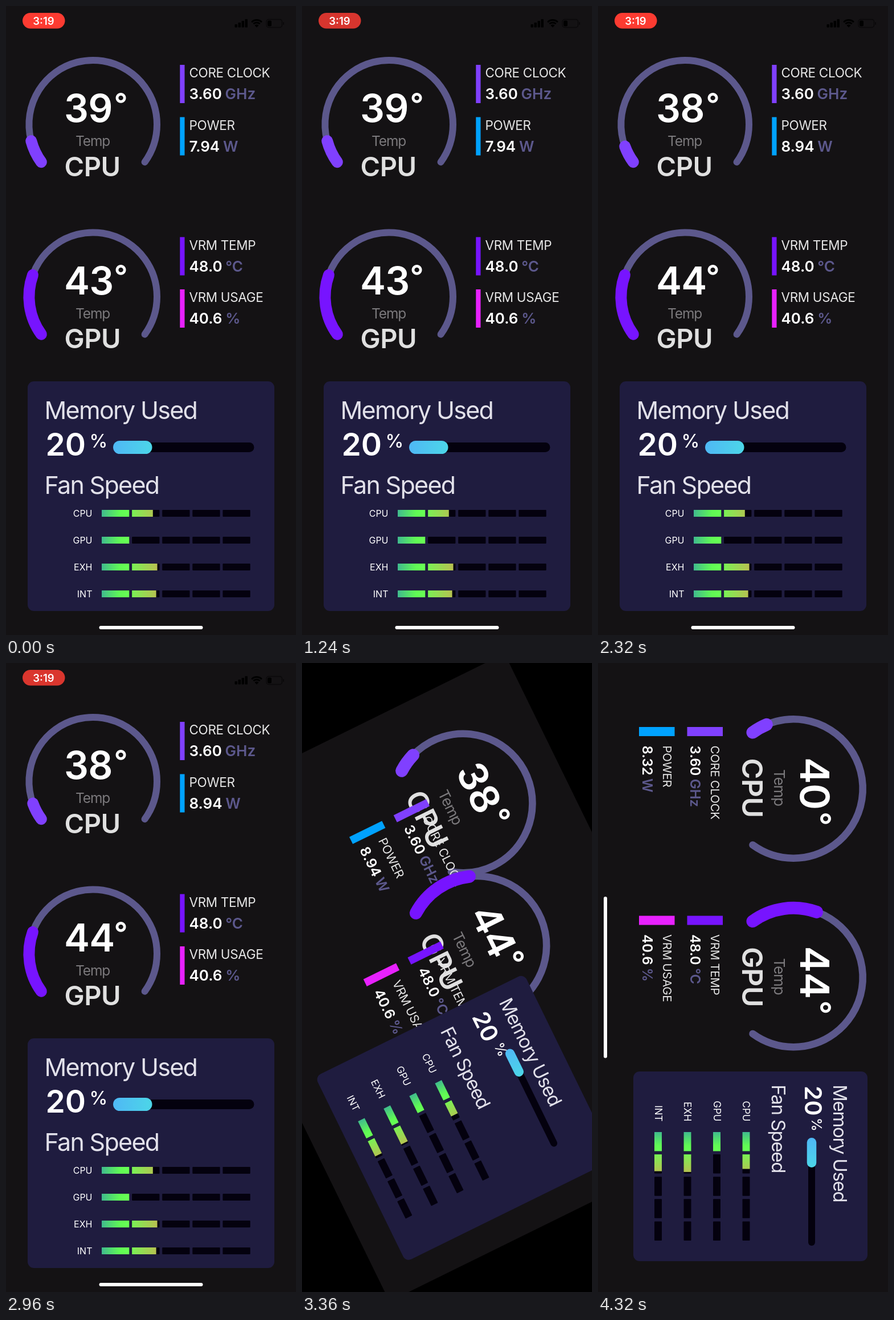
Write an HTML page with a canvas that moves like this. It is 509x1101 px and loops after 5400 ms.

```html
<!DOCTYPE html>
<html lang="en">
<head>
<meta charset="utf-8">
<title>System monitor</title>
<style>
html, body { margin: 0; width: 509px; height: 1101px; overflow: hidden; background: #000; }
canvas { display: block; }
</style>
</head>
<body>
<canvas id="stage" width="509" height="1101"></canvas>
<script>
const ctx = document.getElementById('stage').getContext('2d');
const LOOP = 5400, TURN = 3184, TURN_TIME = 275, UPDATES = [1560, 3400];
const BG = '#141214', RING = '#5c588c', TRACK = '#04010e';
const FANS = [['CPU', 1.76], ['GPU', 1], ['EXH', 1.92], ['INT', 1.88]];

const clamp = x => Math.min(1, Math.max(0, x));
const smooth = x => (x = clamp(x), x * x * (3 - 2 * x));
const rad = deg => deg * Math.PI / 180;

// p: turn progress. Positions glide from portrait to landscape, most sizes jump.
let p = 0;
const mix = (a, b) => a + (b - a) * p;
const jump = (a, b) => p > 0 ? b : a;
// How far the meters lag behind the card while it turns.
const lag = () => 95 * p * (1 - p);

function text(str, x, y, size, weight, color, spacing = 0, align = 'left') {
  ctx.font = `${weight} ${size}px Inter, "Open Sans", sans-serif`;
  ctx.letterSpacing = spacing * size + 'px';
  ctx.textAlign = align;
  ctx.fillStyle = color;
  ctx.fillText(str, x, y);
  return ctx.measureText(str).width;
}

function box(x, y, w, h, r, color) {
  ctx.fillStyle = color;
  ctx.beginPath();
  ctx.roundRect(x, y, w, h, r);
  ctx.fill();
}

function arc(x, y, r, sweep, width, color) {
  ctx.strokeStyle = color;
  ctx.lineWidth = width;
  ctx.lineCap = 'round';
  ctx.beginPath();
  ctx.arc(x, y, r, rad(144), rad(144 + sweep));
  ctx.stroke();
}

function stat(i, color, label, value, unit) {
  const y2 = i * mix(91.5, 84.5);
  box(mix(305.3, 112), mix(103, 290) + y2, mix(8.2, 16), mix(67, 62.5), 0, color);
  const x = mix(321.5, 144.5);
  text(label, x, mix(125, 311) + y2, mix(22.5, 20.5), 400, '#e6e6e6', -0.015);
  const size = mix(26, 24), y = mix(163, 347) + y2;
  const w = text(value, x, y, size, 600, '#fff');
  text(unit, x + w + size * 0.22, y, size, 600, RING);
}

function gauge(i, name, temp, sweep, color, stats) {
  ctx.save();
  ctx.translate(i * mix(0, 330.5), i * mix(301.5, 0));
  const outer = jump(118.5, 128), r = jump(112.3, 121.7);
  const cx = mix(34.2, 92) + outer, cy = mix(88.7, 38) + outer;
  arc(cx, cy, r, 252, jump(12, 12.6), RING);
  arc(cx, cy, r, sweep, jump(20, 22), color);
  const size = jump(67.5, 70), y = mix(203.4, 154.5);
  text(temp, mix(102, 165), y, size, 600, '#fff', -0.01);
  text('°', mix(189.5, 260), y - size * 0.2, size * 0.78, 600, '#fff');
  text('Temp', mix(122, 186), mix(245, 200), jump(24.5, 26), 400, '#7b797c', -0.045);
  text(name, mix(102.5, 166.5), mix(297.6, 255.6), jump(47, 50), 600, '#e0e0e0', -0.01);
  stats.forEach((s, n) => stat(n, ...s));
  ctx.restore();
}

function gradient(x, w, ...stops) {
  const g = ctx.createLinearGradient(x, 0, x + w, 0);
  stops.forEach(([at, color]) => g.addColorStop(at, color));
  return g;
}

function fan([name, level], i) {
  const y = mix(888, 249) + i * mix(47, 51.5), x = mix(168, 821) - lag() / 2;
  const w = jump(48.3, 33.5), pitch = jump(53.1, 39.1), h = jump(12, 13);
  text(name, x - mix(16.5, 18.5), y + 6, jump(16, 17), 400, '#fff', 0, 'right');
  const fill = gradient(x, pitch * 5, [0, '#40ba8e'], [0.12, '#60fa54'],
    [0.18, '#68ff54'], [0.22, '#82ea54'], [0.37, '#b9bf50']);
  for (let n = 0; n < 5; n++) {
    box(x + n * pitch, y - h / 2, w, h, 1, TRACK);
    const part = clamp(level - n);
    if (part) box(x + n * pitch, y - h / 2, w * part, h, 0, fill);
  }
}

function heading(str, y) {
  text(str, mix(67.5, 738), y, jump(43, 33), 400, '#e2e1ea', -0.04);
}

function card() {
  box(mix(38, 715), mix(657, 36), mix(433, 332), mix(402, 411), 11, '#1f1c3f');
  heading('Memory Used', mix(722.6, 96));
  text('20', mix(69.5, 740), mix(787.2, 146), jump(55, 41), 600, '#fff');
  text('%', mix(146.5, 796), mix(773, 134), jump(32, 24), 500, '#fff');
  const x = mix(188, 831) - lag(), y = mix(772.5, 134) - lag(), w = jump(247.5, 189);
  const th = jump(17, 12), fh = jump(23, 16.5), fw = jump(68.5, 52);
  box(x, y - th / 2, w, th, th / 2, TRACK);
  box(x, y - fh / 2, fw, fh, fh / 2, gradient(x, fw, [0, '#4fb8f5'], [1, '#4cd6e8']));
  heading('Fan Speed', mix(853.6, 204));
  FANS.forEach(fan);
}

function statusBar(t) {
  const dim = 0.5 - 0.5 * Math.cos(2 * Math.PI * (t - 150) / 2000);
  box(29, 12, 74.5, 27.5, 13.75, `rgb(${255 - 41 * dim}, ${59 - 6 * dim}, ${49 - 3 * dim})`);
  text('3:19', 66, 32.5, 18.5, 600, '#fff', 0, 'center');
  for (let i = 0; i < 4; i++) {
    const h = 5.5 + i * 3;
    box(401.5 + i * 6, 37.5 - h, 4.5, h, 1, '#000');
  }
  ctx.strokeStyle = ctx.fillStyle = '#000';
  ctx.lineCap = 'butt';
  ctx.lineWidth = 2.8;
  for (const r of [8, 12.5]) {
    ctx.beginPath();
    ctx.arc(440, 37, r, rad(-135), rad(-45));
    ctx.stroke();
  }
  ctx.beginPath();
  ctx.moveTo(440, 37.5);
  ctx.arc(440, 37.5, 5, rad(-135), rad(-45));
  ctx.fill();
  ctx.strokeStyle = '#0a090a';
  ctx.lineWidth = 1.4;
  ctx.beginPath();
  ctx.roundRect(457, 23.5, 27.5, 14, 4);
  ctx.stroke();
  box(459, 25.5, 7, 10, 2, '#000');
  box(486, 28, 2, 5, 1, '#0a090a');
  box(163.5, 1085, 182, 6, 3, '#fff');
}

function draw(t) {
  p = smooth((t - TURN) / TURN_TIME);
  const step = UPDATES.filter(at => t >= at).length;
  const load = step < 2 ? 21 - 5 * smooth((t - UPDATES[0]) / 400) : 13.2;
  const w = mix(509, 1101), h = mix(1101, 509);

  ctx.fillStyle = '#000';
  ctx.fillRect(0, 0, 509, 1101);
  ctx.save();
  ctx.translate(254.5, 550.5);
  ctx.rotate(p * Math.PI / 2);
  ctx.translate(-w / 2, -h / 2);
  box(0, 0, w, h, 0, BG);
  gauge(0, 'CPU', [39, 38, 40][step], load, '#8040ff', [
    ['#8040ff', 'CORE CLOCK', '3.60', 'GHz'],
    ['#00a2ff', 'POWER', ['7.94', '8.94', '8.32'][step], 'W']]);
  gauge(1, 'GPU', step ? 44 : 43, 55.7, '#7714ff', [
    ['#7714ff', 'VRM TEMP', '48.0', '°C'],
    ['#e821ff', 'VRM USAGE', '40.6', '%']]);
  card();
  ctx.restore();

  if (p === 0) statusBar(t);
  ctx.globalAlpha = clamp((t - 3600) / 300);
  box(10, 409, 6, 282.5, 3, '#fff');
  ctx.globalAlpha = 1;
}

const start = performance.now();
function frame() {
  draw((performance.now() - start) % LOOP);
  requestAnimationFrame(frame);
}
frame();
</script>
</body>
</html>
```
